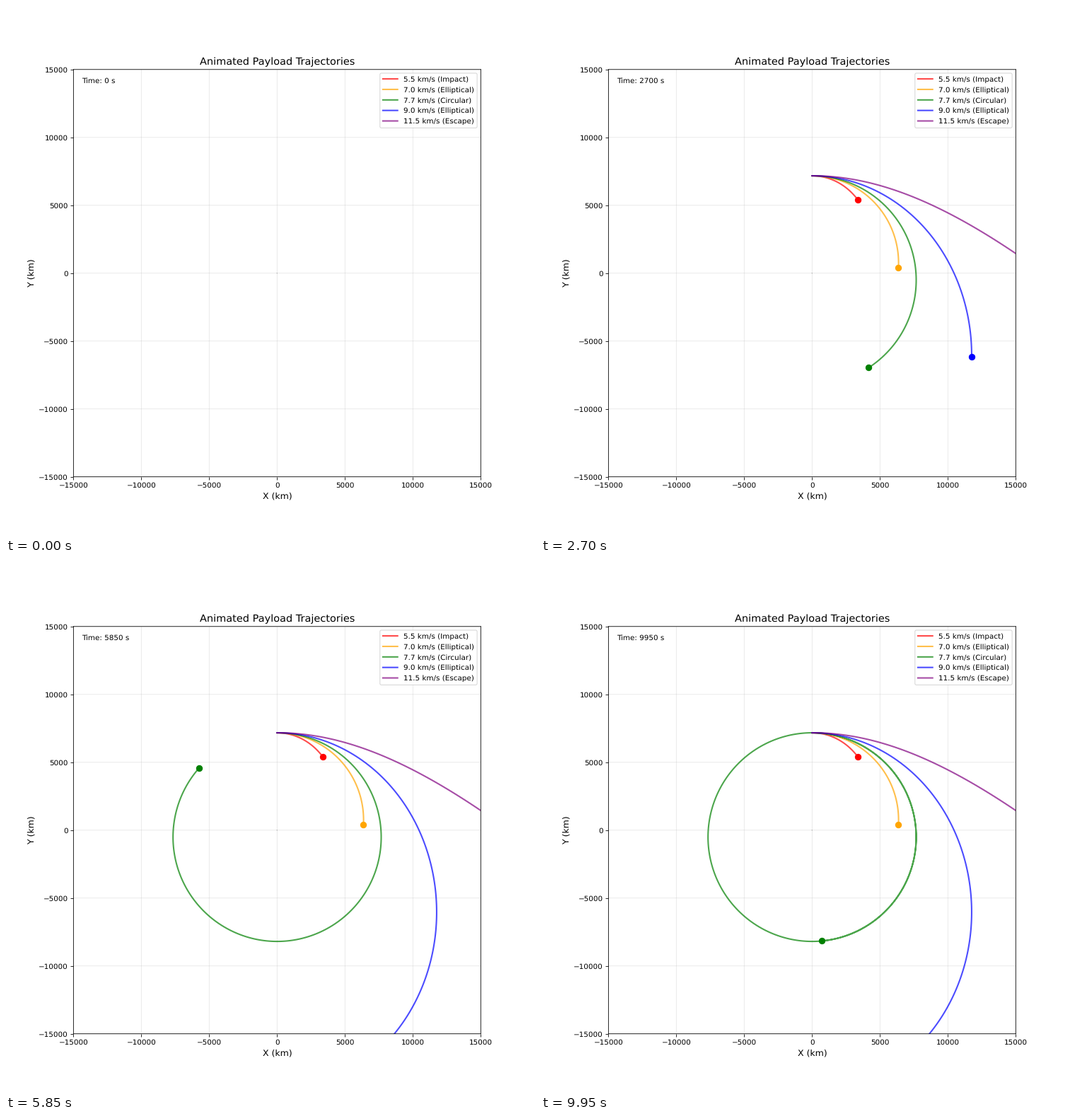
A matplotlib script that plays this animation: 748x748 px, repeating every 10 s.

```python
import numpy as np
import matplotlib.pyplot as plt
from matplotlib.animation import FuncAnimation

MU = 398600.4418     # km^3/s^2
RADIUS = 6371.0      # km
ALTITUDE = 800.0     # km
DT = 2               # s, integration step
STEP = 50            # s of flight per frame
FRAMES = 200
LIMIT = 15000

LAUNCHES = [
    (5.5, "Impact", "red"),
    (7.0, "Elliptical", "orange"),
    (7.7, "Circular", "green"),
    (9.0, "Elliptical", "blue"),
    (11.5, "Escape", "purple"),
]

# Subpixel placement of lines and glyphs
plt.rcParams.update({
    "path.snap": False,
    "path.simplify": False,
    "text.hinting": "no_hinting",
})


def rates(state):
    """Time derivative of rows x, y, vx, vy; one column per launch."""
    pos, vel = state[:2], state[2:]
    r = np.sqrt((pos * pos).sum(axis=0))
    return np.concatenate([vel, -MU * pos / r**3])


def rk4(state):
    k1 = rates(state)
    k2 = rates(state + DT / 2 * k1)
    k3 = rates(state + DT / 2 * k2)
    k4 = rates(state + DT * k3)
    return state + DT / 6 * (k1 + 2 * k2 + 2 * k3 + k4)


def fly():
    """Positions over time, frozen from the moment of impact."""
    speeds = np.array([speed for speed, _, _ in LAUNCHES])
    zero = np.zeros_like(speeds)
    state = np.array([zero, zero + RADIUS + ALTITUDE, speeds, zero])
    track = [state[:2]]
    for _ in range(FRAMES * STEP // DT):
        aloft = np.hypot(state[0], state[1]) > RADIUS
        state = np.where(aloft, rk4(state), state)
        track.append(state[:2])
    return np.array(track)


track = fly()

fig, ax = plt.subplots(figsize=(10, 10), dpi=74.8)
ax.set_aspect("equal")
ax.set_xlim(-LIMIT, LIMIT)
ax.set_ylim(-LIMIT, LIMIT)
ax.set_title("Animated Payload Trajectories", fontsize=14)
ax.set_xlabel("X (km)", fontsize=12)
ax.set_ylabel("Y (km)", fontsize=12)
ax.grid(True, alpha=0.3)
ax.add_patch(plt.Circle((0, 0), RADIUS / 1000, color="gray"))

paths, dots = [], []
for speed, kind, color in LAUNCHES:
    label = f"{speed} km/s ({kind})"
    paths += ax.plot([], [], color=color, lw=2, alpha=0.7, label=label)
    # a scatter point, unlike a line marker, is not rounded to whole pixels
    dots.append(ax.scatter([], [], s=8**2, color=color, linewidth=1, zorder=2))
clock = ax.text(0.02, 0.98, "", transform=ax.transAxes, va="top")
ax.legend(loc="upper right")


def update(frame):
    now = frame * STEP
    last = now // DT
    for i, (path, dot) in enumerate(zip(paths, dots)):
        # every fifth point is smooth enough for the line
        path.set_data(*track[:last + 1:5, :, i].T)
        dot.set_offsets(track[last, :, i])
        path.set_visible(frame > 0)
        dot.set_visible(frame > 0)
    clock.set_text(f"Time: {now} s")
    return [*paths, *dots, clock]


anim = FuncAnimation(fig, update, frames=FRAMES, interval=50,
                     repeat=True, repeat_delay=0)
plt.show()
```
